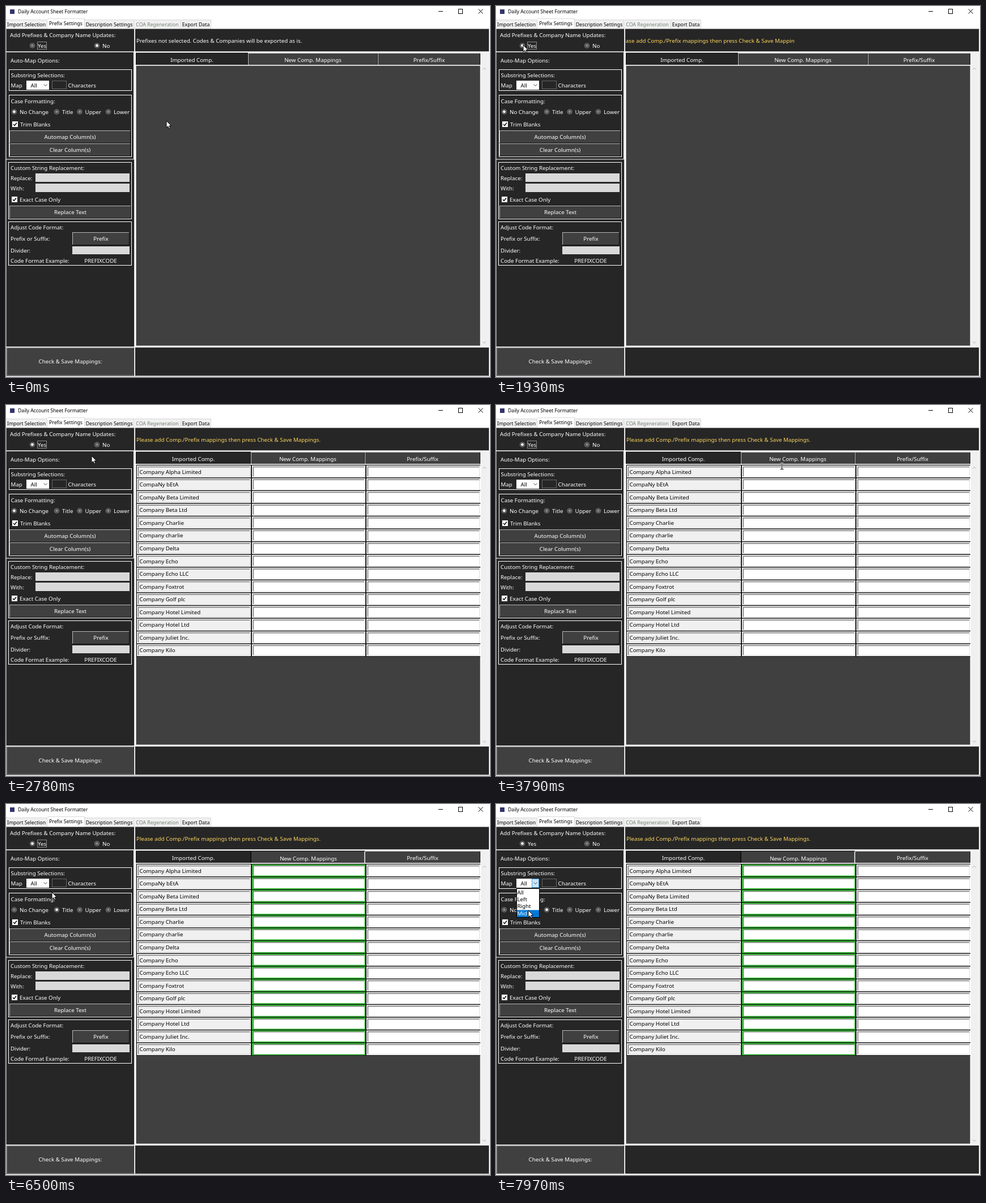
Write an HTML page with a canvas that moves like this. It is 854 px wide and 656 px high and loops after 8 s.

```html
<!DOCTYPE html>
<html lang="en">
<head>
<meta charset="utf-8">
<title>Prefix Settings</title>
<style>
html, body { margin: 0; width: 100%; height: 100%; overflow: hidden; background: #fff; }
canvas { display: block; }
</style>
</head>
<body>
<canvas id="stage" width="854" height="656"></canvas>
<script>
const ctx = document.getElementById('stage').getContext('2d');
const LOOP = 8000, DARK = '#262626', GREY = '#404040', WHITE = '#fff', YELLOW = '#ffd75e';

// Moments at which the window changes state
const CLICK_YES = 1930, SHOW_ROWS = 1970, FIX_HEAD = 2020, PICK_COL = 4080,
      PICK_TITLE = 6100, REFOCUS = 7240, OPEN_LIST = 7280;

// Pointer path: time, x, y
const PATH = [
  [0, 283, 203], [360, 283, 203], [1160, 63, 69], [1210, 62, 69], [1600, 48, 69],
  [2400, 48, 69], [2780, 151, 90], [3230, 415, 258], [3790, 504, 108], [3950, 506, 97],
  [4080, 506, 97], [4860, 145, 139], [4970, 108, 146], [5200, 84, 158], [5450, 80, 172],
  [5690, 90, 186], [6060, 90, 186], [6500, 81, 156], [6740, 70, 141], [7450, 70, 141],
  [7950, 57, 188], [LOOP, 57, 188]
];
const COMPANIES = ['Alpha Limited', 'bEtA', 'Beta Limited', 'Beta Ltd', 'Charlie', 'charlie', 'Delta',
  'Echo', 'Echo LLC', 'Foxtrot', 'Golf plc', 'Hotel Limited', 'Hotel Ltd', 'Juliet Inc.', 'Kilo']
  .map((name, i) => (i == 1 || i == 2 ? 'CompaNy ' : 'Company ') + name);

function fill(x, y, w, h, color) {
  ctx.fillStyle = color;
  ctx.fillRect(x, y, w, h);
}
function frame(x, y, w, h, color = WHITE) {
  ctx.strokeStyle = color;
  ctx.lineWidth = 1;
  ctx.strokeRect(x + .5, y + .5, w - 1, h - 1);
}
function line(color, width, ...pts) {
  ctx.strokeStyle = color;
  ctx.lineWidth = width;
  ctx.beginPath();
  pts.forEach(([x, y]) => ctx.lineTo(x, y));
  ctx.stroke();
}
// y is the middle of the capitals
function text(str, x, y, color = WHITE, align = 'left', size = 9.75) {
  ctx.font = size + 'px "Noto Sans", "Open Sans", sans-serif';
  ctx.textAlign = align;
  ctx.fillStyle = color;
  ctx.fillText(str, x, y + size * .36);
}
function button(label, x, y, w, h) {
  fill(x, y, w, h, '#111');
  fill(x, y, w - 1, h - 1, '#b8b8b8');
  fill(x + 1, y + 1, w - 2, h - 2, GREY);
  text(label, x + w / 2, y + h / 2, WHITE, 'center');
}
function dot(x, y, r, color) {
  ctx.fillStyle = color;
  ctx.beginPath();
  ctx.arc(x, y, r, 0, 7);
  ctx.fill();
}
function radio(label, x, y, on) {
  dot(x, y, 4.6, '#8a8a8a');
  dot(x, y, 3.7, GREY);
  dot(x, y, 2.4, on ? WHITE : '#858585');
  text(label, x + 9.5, y);
}
function check(label, x, y) {
  fill(x, y, 10, 10, WHITE);
  line('#000', 1.4, [x + 2, y + 5], [x + 4.2, y + 7.4], [x + 8, y + 2.5]);
  text(label, x + 14, y + 5);
}
function chevron(x, y, dir, color) {
  line(color, 1, [x - 3, y - 1.5 * dir], [x, y + 1.5 * dir], [x + 3, y - 1.5 * dir]);
}

// Smooth pointer path that never overshoots a resting place
function along(t, axis) {
  let i = 0;
  while (i < PATH.length - 2 && t >= PATH[i + 1][0]) i++;
  const slope = k => {
    const a = PATH[k - 1], b = PATH[k], c = PATH[k + 1];
    if (!a || !c || (b[axis] - a[axis]) * (c[axis] - b[axis]) <= 0) return 0;
    return (c[axis] - a[axis]) / (c[0] - a[0]);
  };
  const a = PATH[i], b = PATH[i + 1], d = b[0] - a[0], u = (t - a[0]) / d, v = 1 - u;
  return v * v * (1 + 2 * u) * a[axis] + u * u * (3 - 2 * u) * b[axis]
    + d * u * v * (v * slope(i) - u * slope(i + 1));
}

function titleBar() {
  fill(0, 0, 854, 656, WHITE);
  fill(7, 6, 8, 8, '#34346e');
  text('Daily Account Sheet Formatter', 21, 10, '#000', 'left', 8.65);
  line('#000', 1, [763, 9.5], [771, 9.5]);
  frame(798, 5, 8, 9, '#000');
  line('#000', 1, [833.5, 5.5], [841.5, 13.5]);
  line('#000', 1, [841.5, 5.5], [833.5, 13.5]);
  const tabs = [['Import Selection', 0, 73], ['Prefix Settings', 73, 139], ['Description Settings', 139, 226],
    ['COA Regeneration', 226, 309], ['Export Data', 309, 362]];
  tabs.forEach(([label, a, b], i) => {
    const on = i == 1;
    fill(a, on ? 22 : 24, b - a, 16, '#d9d9d9');
    fill(a, on ? 23 : 25, b - a - 1, 16, on ? WHITE : '#f0f0f0');
    text(label, (a + b) / 2 - .5, on ? 31 : 32.5, i == 3 ? '#768276' : '#000', 'center', 8.75);
  });
}

function sidebar(t) {
  fill(.6, 40.5, 225.6, 39.8, DARK);
  text('Add Prefixes & Company Name Updates:', 7, 51);
  const yes = t >= CLICK_YES;
  radio('Yes', 46.5, 70, yes);
  radio('No', 160.5, 70, !yes);
  if (t < REFOCUS) frame(55, 63, 17, 14, '#8a8a8a');

  fill(.6, 81.8, 225.6, 520.4, DARK);
  line(WHITE, 1, [225.5, 82], [225.5, 271], [0, 271]);
  text('Auto-Map Options:', 8, 96);
  frame(5, 112, 217, 38);
  text('Substring Selections:', 8.5, 122.5);
  text('Map', 8.5, 140.5);
  fill(36, 132, 40, 16, WHITE);
  text('All', 43.5, 140, '#000');
  frame(81, 132, 26, 15, '#666');
  text('Characters', 109.5, 140.5);

  frame(5, 157, 217, 110);
  text('Case Formatting:', 8.5, 168);
  const title = t >= PICK_TITLE;
  radio('No Change', 14.5, 187, !title);
  radio('Title', 89.5, 187, title);
  radio('Upper', 130, 187);
  radio('Lower', 180.5, 187);
  check('Trim Blanks', 11, 204);
  button('Automap Column(s)', 6, 220, 214, 23);
  button('Clear Column(s)', 6, 243, 214, 23);

  frame(4, 276, 218, 101);
  text('Custom String Replacement:', 8, 286);
  text('Replace:', 8, 304);
  text('With:', 8, 322);
  fill(52, 296, 166, 15, '#d9d9d9');
  fill(52, 314, 166, 15, '#d9d9d9');
  check('Exact Case Only', 10, 337);
  button('Replace Text', 6, 353, 215, 23);

  frame(4, 381, 218, 78);
  text('Adjust Code Format:', 8, 391);
  text('Prefix or Suffix:', 8, 411);
  button('Prefix', 117, 400, 101, 23);
  text('Divider:', 8, 432.5);
  fill(117, 425, 101, 14, '#d9d9d9');
  text('Code Format Example:', 8, 450.5);
  text('PREFIXCODE', 167, 450.5, WHITE, 'center');
  button('Check & Save Mappings:', .6, 603.8, 225.6, 49.8);
}

function message(t) {
  fill(228, 40.5, 624, 39.8, DARK);
  const ask = 'Please add Comp./Prefix mappings then press Check & Save Mappings.';
  if (t < CLICK_YES) text('Prefixes not selected. Codes & Companies will be exported as is.', 230, 61);
  else if (t >= SHOW_ROWS) text(ask, 230, 61, YELLOW);
  else {
    // The label still has the width of its former text
    ctx.save();
    ctx.beginPath();
    ctx.rect(228, 41, 299, 39);
    ctx.clip();
    text(ask, 377.5, 61, YELLOW, 'center');
    ctx.restore();
  }
}

function header(t) {
  const edges = t < FIX_HEAD ? [229, 427, 656, 837] : [229, 432, 633, 837];
  ['Imported Comp.', 'New Comp. Mappings', 'Prefix/Suffix'].forEach((label, i) => {
    const x = edges[i], w = edges[i + 1] - x, down = i == 1 && t >= PICK_COL ? 1 : 0;
    fill(x, 82.6, w, 21.4, i && !down ? '#c8c8c8' : '#111');
    fill(x + 1, 84, w - 2, 20, i ? GREY : DARK);
    fill(x + w - 1, 84, 1, 20, down ? '#c8c8c8' : '#111');
    text(label, x + w / 2 + down, 95 + down, WHITE, 'center');
  });
}

function rows(picked) {
  fill(230, 106, 607, 339, '#181818');
  COMPANIES.forEach((name, i) => {
    const y = 107 + i * 22.57;
    [[231, 201], [434, 200], [636, 201]].forEach(([x, w], col) => {
      fill(x, y, w, 21, picked && col == 1 ? '#32cd32' : WHITE);
      fill(x + 1.6, y + 1.6, w - 3.2, 17.8, '#7c7c7c');
      fill(x + 3.2, y + 3.2, w - 4.8, 16.2, col ? WHITE : '#f0f0f0');
    });
    text(name, 235.5, 118 + i * 22.57, '#000');
  });
}

function table(t) {
  header(t);
  fill(229.6, 105.6, 607, 495, GREY);
  fill(838, 83, 13, 518, '#f0f0f0');
  chevron(844, 111, -1, '#b0b0b0');
  chevron(844, 595, 1, '#b0b0b0');
  if (t >= SHOW_ROWS) rows(t >= PICK_COL);
  fill(228, 603.8, 624, 49.8, DARK);
  fill(0, 654, 854, 1, t < REFOCUS ? '#a8a8a8' : '#e8e8e8');
  fill(852, 40, 1, 614, '#ddd');
}

function combo(t, x, y) {
  const open = t >= OPEN_LIST;
  if (open || (x > 36 && x < 76 && y > 132 && y < 148)) {
    fill(63, 132, 13, 16, '#cce4f7');
    frame(63, 132, 13, 16, '#4a9bd8');
  }
  chevron(69.5, 140, 1, '#444');
  if (!open) return;
  fill(36, 149, 41, 52, '#000');
  fill(37, 150, 39, 50, WHITE);
  const hover = Math.max(0, Math.min(3, Math.floor((y - 149.5) / 12.5)));
  ['All', 'Left', 'Right', 'Mid'].forEach((label, i) => {
    if (i == hover) fill(37, 150 + i * 12.5, 39, 12.5, '#0078d7');
    text(label, 37.5, 156 + i * 12.4, i == hover ? WHITE : '#000');
  });
}

function pointer(t, x, y) {
  const inRows = t >= SHOW_ROWS && x > 231 && x < 837 && y > 105 && y < 445;
  const inEntry = x > 80 && x < 110 && y > 131 && y < 149;
  ctx.save();
  ctx.translate(Math.round(x), Math.round(y));
  if (inRows || inEntry) {
    ctx.globalCompositeOperation = 'difference';
    line(WHITE, 1, [.5, -5], [.5, 5]);
    for (const end of [-5.5, 5.5]) line(WHITE, 1, [-2.5, end], [3.5, end]);
  } else {
    const shape = new Path2D('M0 0V12.2L2.8 9.6L4.7 13.8L6.7 12.9L4.9 8.8H8.6Z');
    ctx.fillStyle = WHITE;
    ctx.strokeStyle = '#000';
    ctx.lineWidth = 1;
    ctx.fill(shape);
    ctx.stroke(shape);
  }
  ctx.restore();
}

function draw(now) {
  const t = now % LOOP, x = along(t, 1), y = along(t, 2);
  titleBar();
  sidebar(t);
  message(t);
  table(t);
  combo(t, x, y);
  pointer(t, x, y);
  requestAnimationFrame(draw);
}
requestAnimationFrame(draw);
</script>
</body>
</html>
```
